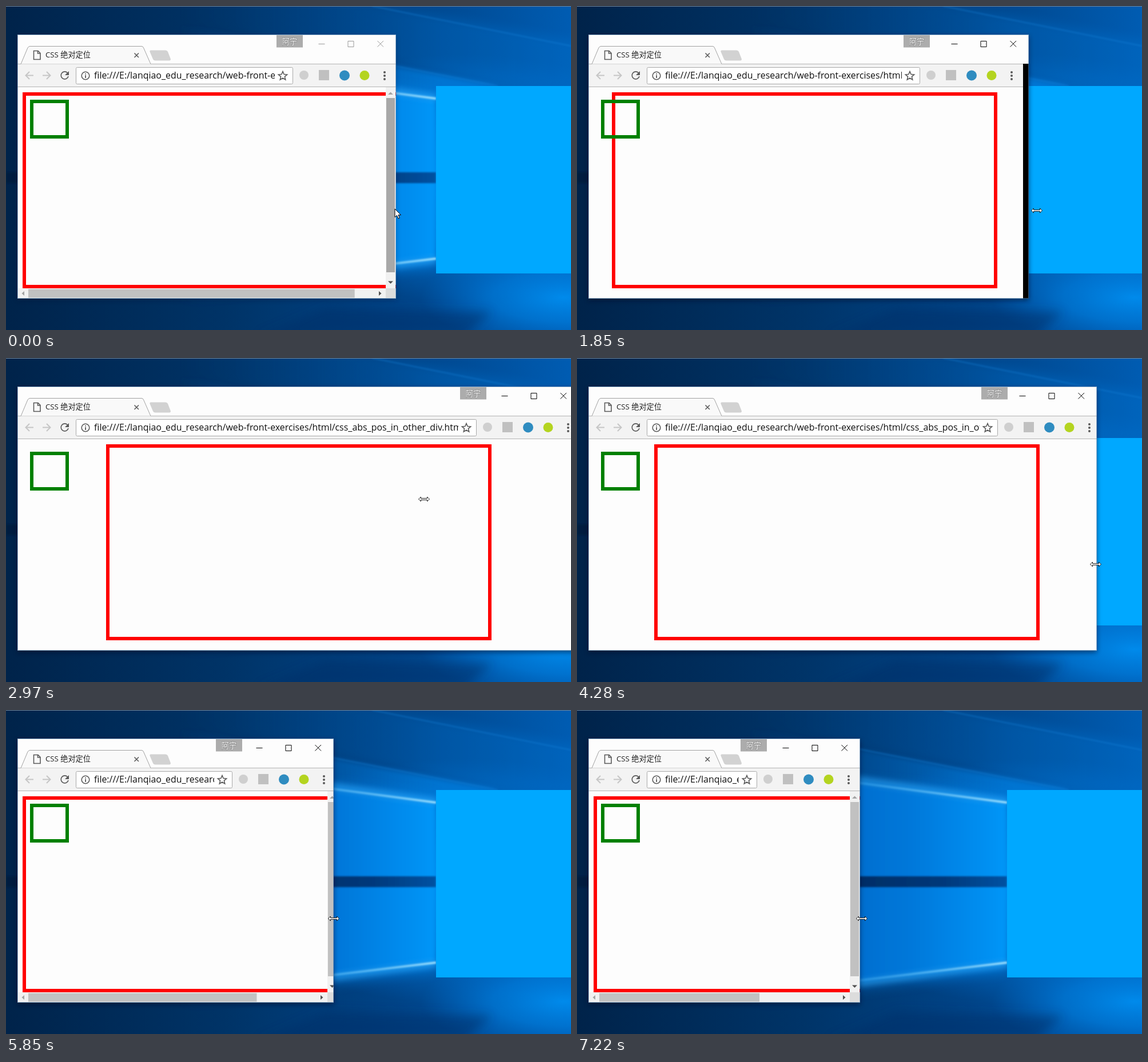
These frames come from a looping animation (988 by 567 pixels, 8 s). An HTML page:

```html
<!DOCTYPE html>
<html lang="zh">
<head>
<meta charset="utf-8">
<title>CSS 绝对定位</title>
<style>
html, body { margin: 0; width: 100%; height: 100%; overflow: hidden; background: #00264f; }
#stage { display: block; width: 988px; height: 567px; }
text { font-family: "Open Sans", "Noto Sans CJK SC", "Noto Sans CJK", sans-serif; }
.line { fill: none; stroke: #5a5a5a; stroke-width: 1.6; }
.pale { stroke: #c6c6c6; stroke-width: 2; }
</style>
</head>
<body>
<svg id="stage" viewBox="0 0 988 567">
  <defs>
    <linearGradient id="night">
      <stop offset="0" stop-color="#00234a"/>
      <stop offset=".4" stop-color="#003468"/>
      <stop offset=".7" stop-color="#004488"/>
      <stop offset="1" stop-color="#005cb2"/>
    </linearGradient>
    <linearGradient id="beam">
      <stop offset="0" stop-color="#0064c4"/>
      <stop offset=".55" stop-color="#0078da"/>
      <stop offset="1" stop-color="#0096f8"/>
    </linearGradient>
    <linearGradient id="fade" gradientUnits="userSpaceOnUse" x1="300" y1="0" x2="760" y2="0">
      <stop offset="0" stop-color="#0060b8" stop-opacity="0"/>
      <stop offset="1" stop-color="#007cdc"/>
    </linearGradient>
    <linearGradient id="ray">
      <stop offset="0" stop-color="#1c9cf4" stop-opacity=".3"/>
      <stop offset="1" stop-color="#a8e6ff"/>
    </linearGradient>
    <linearGradient id="gap">
      <stop offset="0" stop-color="#001a3e"/>
      <stop offset=".6" stop-color="#002a60"/>
      <stop offset=".85" stop-color="#00387a"/>
      <stop offset="1" stop-color="#0052a2"/>
    </linearGradient>
    <radialGradient id="glow">
      <stop offset="0" stop-color="#0096fa"/>
      <stop offset=".5" stop-color="#0082e4" stop-opacity=".75"/>
      <stop offset="1" stop-color="#0070d0" stop-opacity="0"/>
    </radialGradient>
    <filter id="soft" filterUnits="userSpaceOnUse" x="-40" y="-40" width="1200" height="660"><feGaussianBlur stdDeviation="4"/></filter>
    <filter id="wide" filterUnits="userSpaceOnUse" x="-40" y="-40" width="1200" height="660"><feGaussianBlur stdDeviation="9"/></filter>
    <filter id="haze" filterUnits="userSpaceOnUse" x="0" y="0" width="1100" height="567"><feGaussianBlur stdDeviation="1.6"/></filter>
    <clipPath id="urlClip"><rect id="urlBox" x="150" y="105" height="34"/></clipPath>
  </defs>

  <rect width="988" height="567" fill="url(#night)"/>
  <path d="M300 -20H560L1010 64V150L860 136L300 30Z" fill="url(#fade)" opacity=".25" filter="url(#wide)"/>
  <ellipse cx="800" cy="300" rx="430" ry="215" fill="url(#glow)"/>
  <ellipse cx="975" cy="510" rx="250" ry="85" fill="url(#glow)" opacity=".8"/>
  <path d="M300 32L860 140L752 166L300 102Z" fill="url(#fade)" opacity=".8" filter="url(#soft)"/>
  <path d="M300 96L752 150V456L300 520Z" fill="url(#fade)" opacity=".8" filter="url(#wide)"/>
  <path d="M440 580L560 528L850 536L800 580Z" fill="#002f68" opacity=".5" filter="url(#wide)"/>
  <path d="M752 162L380 112V490L752 442Z" fill="url(#beam)" filter="url(#soft)"/>
  <g fill="none">
    <path d="M420 112L752 160M420 488L752 444" stroke="#2aa6fa" stroke-width="14" opacity=".5" filter="url(#soft)"/>
    <path d="M420 118L752 162M420 482L752 442" stroke="url(#ray)" stroke-width="3.500" filter="url(#haze)"/>
    <path d="M420 54L860 140M640 0L988 70" stroke="#1684dc" stroke-width="2" opacity=".45" filter="url(#haze)"/>
  </g>
  <rect y="291" width="752" height="19" fill="url(#gap)" filter="url(#haze)"/>
  <rect x="752" y="140" width="328" height="328" fill="#00a8ff"/>
  <rect width="988" height="1" fill="#74869a"/>

  <rect id="shadow" x="20" y="53" height="462" fill="#001020" filter="url(#soft)"/>
  <svg id="win" x="20" y="50" height="462" overflow="hidden">
    <g transform="translate(-20 -50)">
      <rect x="20" y="50" width="1100" height="52" fill="#fdfdfd"/>
      <rect x="20" y="101" width="1100" height="411" fill="#000"/>
      <rect id="bar" x="20" y="101" height="41" fill="#f3f3f3"/>
      <rect id="page" x="20" y="142" height="370" fill="#fdfdfd"/>
      <path id="rules" stroke="#b4b4b4" fill="none"/>
      <path d="M26 101.500L38 73Q39.500 70.500 42 70.500H237Q239.500 70.500 240.500 73L253 101.500" fill="#f9f9f9" stroke="#a2a2a2"/>
      <path d="M253 77.500H279Q282 77.500 283 80L288 93Q288 95.500 286 95.500H261Q258 95.500 257 93L251.500 80Q251 77.500 253 77.500Z" fill="#d2d2d2"/>
      <path class="line" d="M48.500 78.500H56L60 82.500V93.500H48.500ZM55.500 78.500V83H60"/>
      <text x="69" y="90" font-size="13.200" fill="#222">CSS 绝对定位</text>
      <path class="line" d="M224.500 82.500L232 90M232 82.500L224.500 90"/>
      <path class="line pale" d="M48 121.500H34.500M41 115L34.500 121.500L41 128M64 121.500H77.500M71 115L77.500 121.500L71 128"/>
      <path class="line" d="M107.500 117A6.500 6.500 0 1 0 109 123"/>
      <path d="M110 114V121H103Z" fill="#5a5a5a"/>
      <rect id="field" x="122.500" y="107.500" height="29" rx="2" fill="#fff" stroke="#a9a9a9"/>
      <circle class="line" cx="139" cy="122" r="6.800"/>
      <path d="M138.200 121h1.800v5h-1.800zM138.200 118h1.800v1.800h-1.800z" fill="#5a5a5a"/>
      <text x="154" y="127" font-size="15.920" fill="#111" clip-path="url(#urlClip)">file:///E:/lanqiao_edu_research/web-front-exercises/html/css_abs_pos_in_other_div.html</text>

      <g id="tools">
        <path id="star" class="line"/>
        <circle cx="-161" cy="121" r="8" fill="#cfcfcf"/>
        <rect x="-135" y="112" width="18" height="18" fill="#c0c0c0"/>
        <circle cx="-90" cy="121.500" r="9" fill="#2f8cc0"/>
        <circle cx="-55" cy="121.500" r="8.500" fill="#b4d420"/>
        <g fill="#5a5a5a">
          <circle cx="-20" cy="116" r="2"/><circle cx="-20" cy="122" r="2"/><circle cx="-20" cy="128" r="2"/>
        </g>
        <rect x="-209" y="51" width="46" height="21.500" fill="#acacac"/>
        <text x="-186" y="67" font-size="13.500" text-anchor="middle" fill="#fff" stroke="#777" stroke-width="1" style="paint-order: stroke">阿宁</text>
      </g>
      <path id="buttons" fill="none" d="M-135.500 66.500h11M-84 61.500h10v10h-10zM-32.500 61l10.500 10.500M-22 61l-10.500 10.500"/>

      <rect id="red" y="154" width="668" height="337" fill="none" stroke="#f00" stroke-width="6"/>
      <rect x="45" y="167" width="62" height="62" fill="none" stroke="#008000" stroke-width="6"/>

      <g id="scroll">
        <rect id="hTrack" x="21" y="494" height="17" fill="#f1f1f1"/>
        <rect id="hThumb" x="39" y="495.500" height="15" fill="#c1c1c1"/>
        <path d="M32 499v8l-4.500-4z" fill="#a3a3a3"/>
        <g id="vScroll">
          <rect x="-18" y="142" width="17" height="352" fill="#f1f1f1"/>
          <rect id="vThumb" x="-17" y="161" width="15" height="305"/>
          <path d="M-14 155h9l-4.500-4.500z" fill="#a3a3a3"/>
          <path d="M-14 481.500h9l-4.500 4.500zM-30 499v8l4.500-4z" fill="#505050"/>
          <rect x="-18" y="494" width="17" height="17" fill="#dcdcdc"/>
        </g>
      </g>
    </g>
  </svg>
  <rect id="frame" x="20.500" y="50.500" height="461" fill="none" stroke="#5c86b0" stroke-opacity=".6"/>

  <g id="mouse" stroke="#000" fill="#fff">
    <path id="arrow" d="M0 0V14.500L3.500 11.500L6 17L8.300 16L6 10.700H10.500Z"/>
    <path id="resize" stroke-width=".9" d="M-9.500 0L-5.500 -4V-1.300H5.500V-4L9.500 0L5.500 4V1.300H-5.500V4Z"/>
  </g>
</svg>
<script>
const LOOP = 8000;
const el = {};
document.querySelectorAll("[id]").forEach(n => el[n.id] = n);
const set = (node, attrs) => {
  for (const k in attrs) node.setAttribute(k, attrs[k]);
};
const show = (node, on) => node.setAttribute("visibility", on ? "visible" : "hidden");

// start, end and number of visible steps in each burst of motion
const bursts = [
  [250, 400, 2], [860, 1850, 8], [1970, 2970, 8], [3400, 4400, 8],
  [4550, 5580, 9], [5730, 6760, 9], [6910, 7220, 3]
];

// time, window edge, toolbar edge, page edge, pointer x, pointer y
const keys = [
  [0, 682, 682, 682, 680, 355],
  [250, 682, 682, 682, 683, 362],
  [400, 682, 682, 682, 685, 364],
  [860, 684, 682, 682, 688, 363],
  [1850, 790, 780, 776, 804, 358],
  [2827, 1000, 996, 990, 1004, 356],
  [2970, 1002, 1003, 1003, 731, 247],
  [3400, 1000, 1003, 1003, 1000, 358],
  [4257, 909, 916, 924, 907, 361],
  [4400, 887, 890, 894, 891, 362],
  [4550, 852, 865, 873, 852, 363],
  [4807, 744, 758, 766, 742, 364],
  [5580, 602, 605, 608, 603, 365],
  [5859, 573, 576, 580, 573, 365],
  [6760, 502, 500, 502, 505, 365],
  [7220, 495, 495, 495, 498, 365]
];

function snap(t) {
  let at = 0;
  for (const [a, b, n] of bursts) {
    if (t < a) break;
    const gap = (b - a) / (n - 1);
    at = a + gap * Math.min(n - 1, Math.floor((t - a) / gap + 0.1));
  }
  return at;
}

function pose(t) {
  const i = keys.findIndex(k => k[0] > t);
  if (i < 0) return keys[keys.length - 1].slice(1);
  const p = keys[i - 1], q = keys[i];
  const f = (t - p[0]) / (q[0] - p[0]);
  return p.slice(1).map((v, j) => Math.round(v + (q[j + 1] - v) * f));
}

function starPath(cx, cy, r) {
  let d = "";
  for (let i = 0; i < 10; i++) {
    const a = i * Math.PI / 5, k = i % 2 ? r * 0.45 : r;
    d += (i ? "L" : "M") + (cx + k * Math.sin(a)) + " " + (cy - k * Math.cos(a));
  }
  return d + "Z";
}
set(el.star, { d: starPath(-198, 122.5, 8) });

function draw(time) {
  const t = snap(time);
  const [edge, tools, page, mx, my] = pose(t);
  const active = t >= 860;

  set(el.win, { width: edge - 20 });
  set(el.frame, { width: edge - 21 });
  set(el.shadow, { width: edge - 20, opacity: active ? 0.55 : 0.25 });
  set(el.bar, { width: tools - 20 });
  set(el.page, { width: tools - 20 });
  set(el.rules, { d: `M20 101.5H${tools}M20 141.5H${tools}` });
  set(el.field, { width: tools - 303 });
  set(el.urlBox, { width: tools - 362 });
  set(el.tools, { transform: `translate(${tools})` });
  set(el.buttons, { transform: `translate(${edge})`, stroke: active ? "#000" : "#999" });

  // centred while it fits, otherwise held at the margin
  const left = Math.max(29, Math.round((20 + page) / 2 - 337));
  set(el.red, { x: left + 3 });

  show(el.scroll, page < 712);
  set(el.hTrack, { width: Math.max(0, page - 39) });
  set(el.hThumb, { width: (page - 74) * (page - 40) / 684 });
  set(el.vScroll, { transform: `translate(${page})` });
  set(el.vThumb, { fill: t < 250 ? "#a8a8a8" : "#c1c1c1" });

  set(el.mouse, { transform: `translate(${mx} ${my})` });
  show(el.arrow, t < 250);
  show(el.resize, t >= 250);
}

const start = performance.now();
function tick() {
  draw((performance.now() - start) % LOOP);
  requestAnimationFrame(tick);
}
tick();
</script>
</body>
</html>
```
